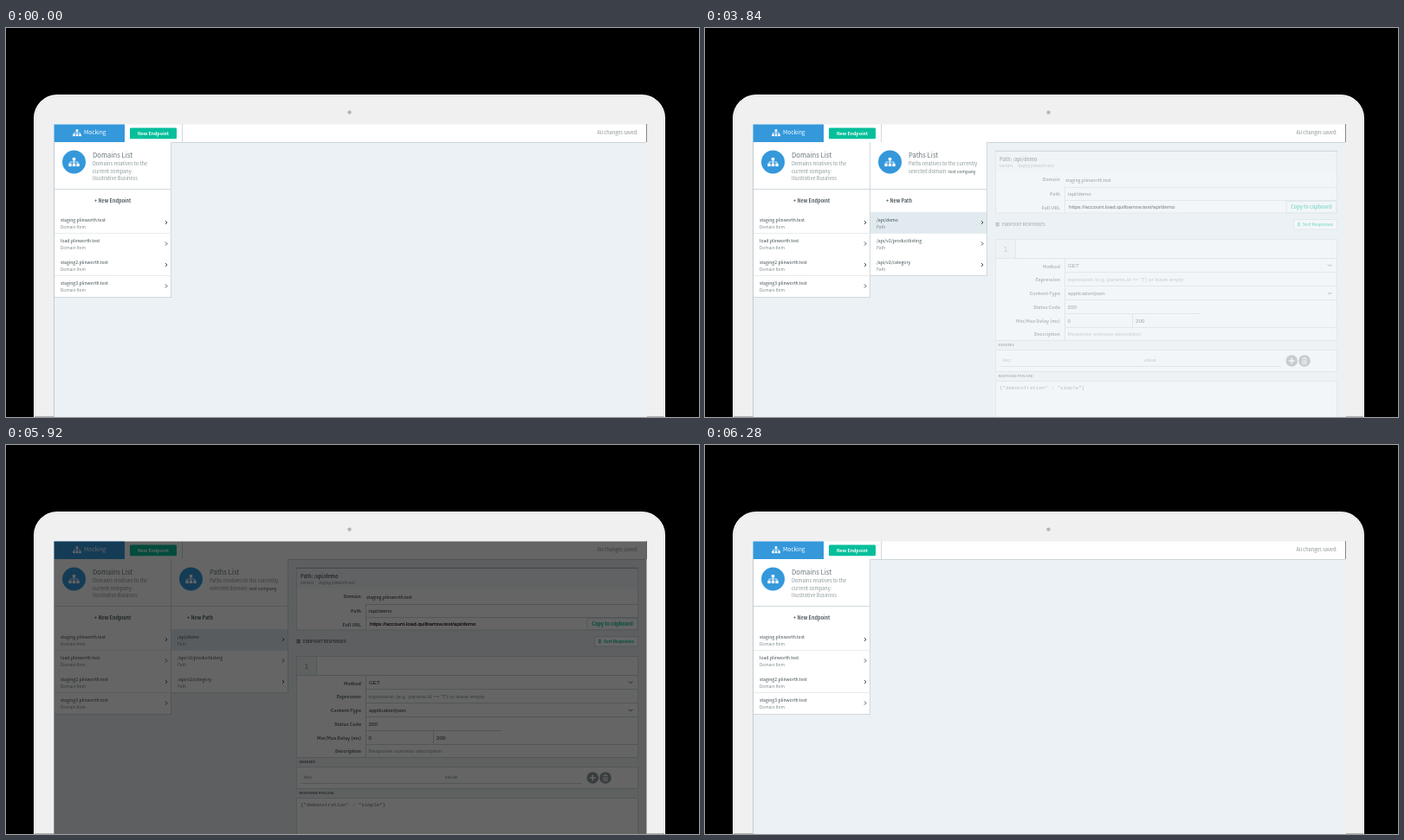
These frames come from a looping animation (800x450 px, 6.32 s). An HTML page:

```html
<!DOCTYPE html>
<html lang="en">
<head>
<meta charset="utf-8">
<title>Mocking dashboard</title>
<style>
  html, body { margin: 0; width: 100%; height: 100%; overflow: hidden; background: #000; }
  svg { display: block; width: 100vw; height: 100vh; }
  text { font-family: "Noto Sans CJK JP", "Noto Sans CJK SC", "Noto Sans CJK", "Open Sans", sans-serif; white-space: pre; }
  .field { font-family: "Liberation Sans", Arial, sans-serif; }
  .mono { font-family: "Liberation Mono", "DejaVu Sans Mono", monospace; }
</style>
</head>
<body>
<svg id="stage" viewBox="0 0 800 450" xmlns="http://www.w3.org/2000/svg"></svg>
<script>
const LOOP = 6320;
const BLUE = '#3498db', GREEN = '#05bf9b', LINE = '#d0d9dd', PALE = '#ecf1f5', ACTIVE = '#e1eaef';
const DARK = '#3f4b50', GREY = '#7c888c', LABEL = '#5b676d', HINT = '#8b989f';
const SITE = 'plinworth.test';
const hosts = ['staging', 'load', 'staging2', 'staging3'].map(name => `${name}.${SITE}`);
const paths = ['/api/demo', '/api/v2/productlisting', '/api/v2/category'];
const ROW_TOP = 213, ROW_STEP = 24.5;
const rowY = i => ROW_TOP + i * ROW_STEP;

const rect = (x, y, w, h, fill, extra = '') =>
  `<rect x="${x}" y="${y}" width="${w}" height="${h}" fill="${fill}" ${extra}/>`;
const hline = (x1, x2, y, color = LINE) => rect(x1, Math.round(y), x2 - x1, 1, color);
const vline = (x, y1, y2, color = LINE) => rect(Math.round(x), y1, 1, y2 - y1, color);
const text = (x, y, size, fill, content, extra = '') =>
  `<text x="${x}" y="${y}" font-size="${size}" fill="${fill}" ${extra}>${content}</text>`;
const bold = (x, y, size, fill, content, extra = '') =>
  text(x, y, size, fill, content, `font-weight="700" ${extra}`);
const field = (x, y, content, fill = '#333', extra = '') =>
  text(x, y, 6.2, fill, content, `class="field" ${extra}`);
const stroke = (d, color, width = 0.9) =>
  `<path d="${d}" fill="none" stroke="${color}" stroke-width="${width}"/>`;
const group = (id, content) => `<g id="${id}">${content}</g>`;

const sitemap = (x, y, scale) => `<g transform="translate(${x} ${y}) scale(${scale})">
  ${rect(-1.7, -5, 3.4, 3.3, '#fff')}${[-6.2, -1.7, 2.8].map(bx => rect(bx, 1.8, 3.4, 3.3, '#fff')).join('')}
  ${stroke('M0 -2V2M-4.5 2V0H4.5V2', '#fff', 0.8)}</g>`;

const chevron = (x, y) => stroke(`M${x - 1} ${y - 2}l2 2l-2 2`, '#46535a', 1);
const dropdown = y => stroke(`M719 ${y - 1}l2.2 2.2l2.2 -2.2`, '#59656b', 1);

function row(x, i, title, kind, id) {
  const y = rowY(i);
  return rect(x, y, 135, ROW_STEP, '#fff') +
    (id ? rect(x, y, 135, ROW_STEP, ACTIVE, `id="${id}"`) : '') +
    text(x + 7, y + 10.8, 5.1, DARK, title) +
    text(x + 7, y + 18.6, 4.8, GREY, kind) +
    chevron(x + 129, y + 12) +
    hline(x, x + 135, y + ROW_STEP - 0.4) + vline(x + 134, y, y + ROW_STEP);
}

function listHead(x, title, lines, action, actionX) {
  return rect(x, 132, 135, 81, '#fff') +
    `<circle cx="${x + 22.5}" cy="155" r="13.5" fill="${BLUE}"/>` + sitemap(x + 22.5, 155, 1) +
    text(x + 44, 150, 7.7, '#69757a', title) +
    lines.map((line, i) => text(x + 44, 159.4 + i * 8.2, 5.6, '#8a9699', line)).join('') +
    bold(actionX, 202.3, 5.45, '#4d595e', action) +
    hline(x, x + 135, 186) + hline(x, x + 135, 212.6) + vline(x + 134, 132, 213);
}

const topBar = rect(55.5, 111.5, 684, 20.5, '#fff') +
  hline(55.5, 739, 132, '#cdd5d9') + vline(739, 111, 132, '#80878a') +
  rect(55.5, 111.5, 81.5, 20.5, BLUE) + sitemap(82, 121.2, 0.78) +
  text(90, 123.4, 6.5, '#fff', 'Mocking') +
  rect(143, 115.5, 54, 12.7, GREEN, 'rx="1.3"') +
  bold(170, 123.8, 5.2, '#fff', 'New Endpoint', 'text-anchor="middle"') +
  vline(203, 111.5, 132) +
  text(730, 123.4, 5.6, '#88918f', 'All changes saved.', 'text-anchor="end"');

const domains = listHead(56, 'Domains List',
  ['Domains relatives to the', 'current company:', 'Illustrative Business'], '+ New Endpoint', 102) +
  hosts.map((host, i) => row(56, i, host, 'Domain Item', i ? '' : 'hostActive')).join('');

const pathHead = listHead(191, 'Paths List',
  ['Paths relatives to the currently',
   'selected domain: <tspan font-size="5" fill="#4b565b">test company</tspan>'], '+ New Path', 209);

const label = (y, content) => bold(410, y, 5.3, LABEL, content, 'text-anchor="end"');
const section = (y, content) => rect(335.5, y, 394, 11, '#f2f5f6') +
  hline(335.5, 729.5, y - 0.4) + hline(335.5, 729.5, y + 10.4) + bold(338.5, y + 7, 4, LABEL, content);
const outline = (x, y, w, h) => rect(x, y, w, h, '#fff', `stroke="${LINE}" stroke-width=".9"`);

function details() {
  const summary = outline(335.5, 142, 394, 72) + rect(336, 142, 393, 24, '#f7f9fa') +
    hline(335, 730, 141.6, '#aab6bd') +
    bold(340, 154, 5.5, LABEL, 'Path: /api/demo') +
    text(340, 161, 4.1, GREY, 'Domain:') + text(361, 161, 4.1, GREY, hosts[0]) +
    label(177.3, 'Domain') + text(416, 177.6, 5.2, '#222', hosts[0], 'font-weight="500"') +
    label(194, 'Path') + field(418.5, 194, paths[0]) +
    label(210, 'Full URL') +
    field(420, 209, 'https://account.load.quilbarrow.test/api/demo', '#111', 'stroke="#111" stroke-width=".12"') +
    hline(415, 729.5, 183.6) + hline(415, 729.5, 199.2) + vline(414.6, 184, 214) +
    outline(671, 200.5, 58, 13.2) + bold(700, 209, 5.5, GREEN, 'Copy to clipboard', 'text-anchor="middle"');

  const heading = [225, 226.6, 228.2].map(y => rect(335.5, y, 4.2, 1.1, LABEL)).join('') +
    bold(343, 229, 4.35, LABEL, 'ENDPOINT RESPONSES') +
    outline(679.5, 221.5, 50, 11.5) +
    `<path d="M683.7 226.4l1.8-2.2 1.8 2.2zM683.7 227.6l1.8 2.2 1.8-2.2z" fill="${GREEN}"/>` +
    bold(725, 228.9, 4.65, GREEN, 'Sort Responses', 'text-anchor="end"');

  const labels = ['Method', 'Expression', 'Content-Type', 'Status Code', 'Min/Max Delay (ms)', 'Description'];
  const form = outline(335.5, 244.5, 394, 210) + rect(336, 245, 22, 21.5, '#f2f5f6') +
    vline(357.6, 244.5, 266.5) + hline(335.5, 729.5, 266.4) +
    text(347, 259, 8, GREY, '1', 'text-anchor="middle"') +
    labels.map((name, i) => label(277.6 + i * 15.75, name)).join('') +
    vline(414.6, 267, 361) +
    [282, 298, 314.4, 345.8].map(y => hline(415, 729.5, y)).join('') +
    hline(415, 572, 330) + vline(493.2, 330.5, 346) +
    field(419, 277, 'GET') + dropdown(274.5) +
    field(418.5, 292.7, "expression (e.g. params.id == 'T') or leave empty", HINT) +
    field(419, 308.8, 'application/json') + dropdown(306.8) +
    field(418.5, 325.4, '200') + field(418.5, 340.8, '0') + field(497, 340.8, '200') +
    field(418.5, 356, 'Response scenario description', HINT);

  const headers = section(361.3, 'HEADERS') +
    field(343.5, 386, 'key', HINT) + field(506.5, 386, 'value', HINT) +
    hline(340, 664.5, 390.8) +
    [677.3, 692].map(x => `<circle cx="${x}" cy="385" r="6.8" fill="#8f9a9f"/>`).join('') +
    stroke('M673.9 385h6.8M677.3 381.6v6.8', '#fff', 1.4) +
    stroke('M689 382.6h6M691 382.2v-.9h2v.9M689.8 383.8v4.8h4.4v-4.8M691.3 384.3v3.4M692.7 384.3v3.4', '#fff', 0.8);

  const payload = section(397.3, 'RESPONSE PAYLOAD') +
    text(340, 418, 5.85, '#69757a', '{"demonstration" : "simple"}', 'class="mono"');

  return summary + heading + form + headers + payload;
}

const tablet = rect(32, 77, 729, 420, '#fff', 'rx="27"') +
  rect(33.5, 78.5, 726, 420, '#f0f0f0', 'rx="25.5" stroke="#dedede" stroke-width=".7"') +
  '<circle cx="396.5" cy="97.6" r="2.2" fill="#b4b4b4"/>';

// The screen is inset by half a pixel, so its edge blends with the bezel.
const screenRect = (fill, extra) => rect(55.5, 111.5, 684, 339, fill, extra);

const stage = document.getElementById('stage');
stage.innerHTML = tablet + screenRect(PALE) + vline(55, 132, 450, '#c3cbd0') +
  topBar + domains + group('pathHead', pathHead) +
  paths.map((path, i) => group(`path${i}`, row(191, i, path, 'Path', i ? '' : 'pathActive'))).join('') +
  group('details', details()) + screenRect('#000', 'id="shade"') +
  rect(33, 449, 22, 1, '#b4b4b4') + rect(740, 449, 20, 1, '#b4b4b4');

const ramp = (t, start, length) => Math.min(1, Math.max(0, (t - start) / length));
const fade = (id, value) => document.getElementById(id).setAttribute('opacity', value.toFixed(3));

function render(t) {
  const shown = t < 6020 ? 1 : 0;
  const move = ramp(t, 3200, 400);
  fade('hostActive', shown * ramp(t, 720, 400) * (1 - move));
  fade('pathActive', shown * move);
  fade('pathHead', shown * ramp(t, 760, 500));
  [1260, 2260, 2760].forEach((start, i) => fade(`path${i}`, shown * ramp(t, start, 500)));
  fade('details', shown * ramp(t, 3600, 600));
  fade('shade', ramp(t, 5800, 200) - ramp(t, 6040, 240));
}

const begin = performance.now();
function tick() {
  render((performance.now() - begin) % LOOP);
  requestAnimationFrame(tick);
}
render(0);
tick();
</script>
</body>
</html>
```
